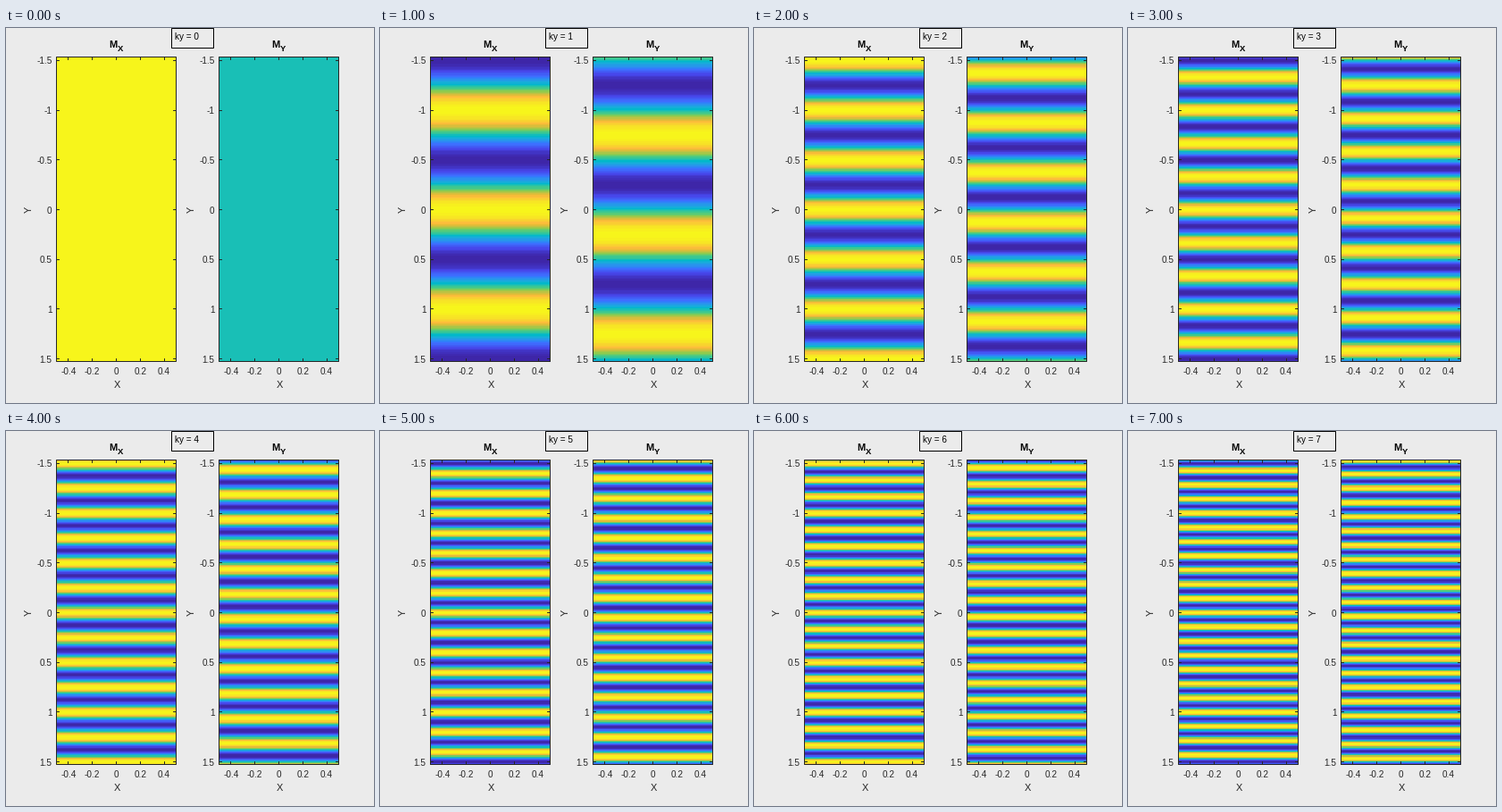
Write a matplotlib script that moves like this. It is 412 px wide and 420 px high and loops after 8000 ms.

```python
import numpy as np
import matplotlib.pyplot as plt
from matplotlib.animation import FuncAnimation
from matplotlib.colors import LinearSegmentedColormap
from matplotlib.patches import Rectangle

W, H, DPI = 412, 420, 100
BG, INK = "#ebebeb", "#262626"
TOP, BOTTOM, WIDTH = 32.5, 373.5, 134
STEP, ROWS, Y_FIRST = 0.01, 306, -1.53
SCALE = (BOTTOM - TOP) / (ROWS * STEP)
TICK = 3.4

# Blue to yellow ramp: level (0-63) and colour of each key point
KEYS = {0: "#3e26a8", 7: "#4747eb", 14: "#3e6fff", 16: "#327cfc",
        20: "#2b91ef", 26: "#18addb", 29: "#01b8ca", 32: "#19bfb6",
        38: "#4acb84", 43: "#8fcb4e", 51: "#f0ba36", 53: "#febe3c",
        58: "#f7dc2a", 63: "#f7f51b"}
ramp = LinearSegmentedColormap.from_list(
    "ramp", [(level / 63, color) for level, color in KEYS.items()], N=64)

plt.rcParams["font.family"] = "Liberation Sans"
fig = plt.figure(figsize=(W / DPI, H / DPI), dpi=DPI, facecolor=BG)
ax = fig.add_axes([0, 0, 1, 1])
ax.axis("off")


def y_pixel(v):
    return TOP + (v - Y_FIRST + STEP / 2) * SCALE


def label(x, y, text, px=10, color=INK, **kw):
    kw = {"ha": "center", "va": "baseline", **kw}
    return ax.text(x, y, text, fontsize=px * 72 / DPI, color=color, **kw)


def line(x0, y0, x1, y1):
    ax.plot([x0, x1], [y0, y1], color=INK, lw=0.72,
            solid_capstyle="butt", snap=False, zorder=3)


def frame_box(x, y, w, h, color, face="none"):
    ax.add_patch(Rectangle((x, y), w, h, fc=face, ec=color, lw=0.72,
                           snap=False, zorder=4))


def panel(left, sub):
    right, mid = left + WIDTH, left + WIDTH / 2
    image = ax.imshow(np.zeros((2, 1)), cmap=ramp, vmin=-1, vmax=1,
                      extent=(left - 0.5, right + 0.5, BOTTOM + 0.5, TOP - 0.5),
                      interpolation="nearest", aspect="auto")
    frame_box(left, TOP, WIDTH, BOTTOM - TOP, INK)

    for v in np.arange(-2, 3) / 5:
        x = np.floor(mid + v * WIDTH) + 0.5
        line(x, TOP, x, TOP + TICK)
        line(x, BOTTOM, x, BOTTOM - TICK)
        label(mid + v * WIDTH, 388, f"{v:g}")
    for v in np.arange(-3, 4) / 2:
        y = np.floor(y_pixel(v)) + 0.5
        line(left, y, left + TICK, y)
        line(right, y, right - TICK, y)
        label(left - 5, y_pixel(v) + 4, f"{v:g}", ha="right")

    label(mid + 0.5, 403, "X", 11)
    label(left - 31, 203, "Y", 11, rotation=90, va="center")
    label(mid - 8.7, 22, "M", 11, "black", ha="left", weight="bold")
    label(mid + 1.2, 26, sub, 9.5, "black", ha="left", weight="bold")
    return image


image_x = panel(56.5, "X")
image_y = panel(238.5, "Y")
frame_box(185.5, 0.5, 47, 22, "black", BG)
caption = label(189, 13, "ky = 0", color="black", ha="left", zorder=5)
ax.set_xlim(0, W)
ax.set_ylim(H, 0)

# Sample value seen by each pixel row of a panel
rows = np.arange(TOP, BOTTOM + 1)
index = np.floor((rows - TOP) / (BOTTOM - TOP) * ROWS).clip(0, ROWS - 1)
y_pos = Y_FIRST + index[:, None] * STEP


def update(ky):
    phase = 2 * np.pi * ky * y_pos
    image_x.set_data(np.cos(phase))
    image_y.set_data(np.sin(phase))
    caption.set_text(f"ky = {ky}")
    return image_x, image_y, caption


anim = FuncAnimation(fig, update, frames=8, interval=1000, repeat=True,
                     repeat_delay=0, blit=False)
plt.show()
```
